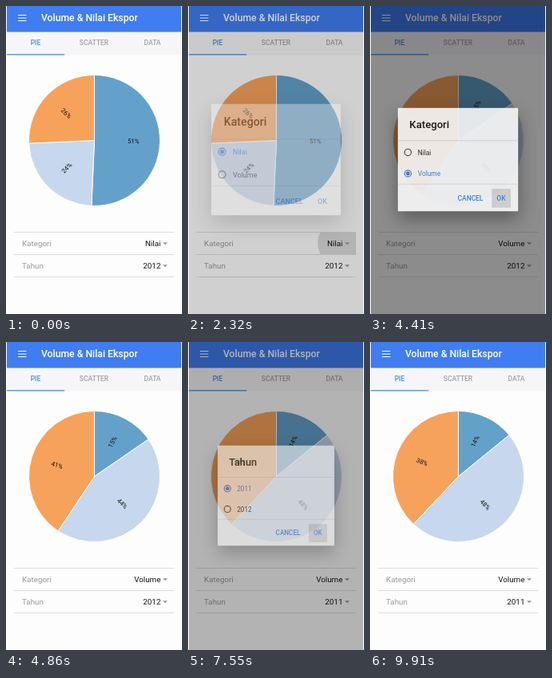
Recreate the animation shown at these times as an HTML page. Size 220x386 px, loop 9.96 s.

```html
<!DOCTYPE html>
<html lang="id">
<head>
<meta charset="utf-8">
<title>Volume &amp; Nilai Ekspor</title>
<style>
  html, body { margin: 0; width: 100%; height: 100%; overflow: hidden; background: #fdfdfd; }
  svg { display: block; width: 220px; height: 386px; font-family: Roboto, sans-serif; }
  .title { font-size: 12.2px; font-weight: 500; fill: #fff; }
  .tab { font-size: 8.5px; font-weight: 500; fill: #a3a3a6; text-anchor: middle; }
  .tab.on { fill: #4a8bd8; }
  .label { font-size: 9.8px; fill: #999; }
  .value { font-size: 9.8px; fill: #151515; text-anchor: end; }
  .slice { stroke: #fff; stroke-width: 1; }
  .pct { font-size: 7.9px; fill: #111; text-anchor: middle; }
  .ripple { fill: #555; }
  .card { fill: #fafafa; filter: drop-shadow(0 9.5px 12px rgba(0, 0, 0, .42)); }
  .head { font-size: 13.3px; font-weight: 500; fill: #111; }
  .opt { font-size: 8.5px; }
  .ring { fill: none; stroke-width: 1.2; }
  .dot { fill: #3b76d6; }
  .btn { font-size: 8.5px; font-weight: 500; fill: #3b7de0; }
  .rule { stroke: #dedede; stroke-width: 1; }
</style>
</head>
<body>
<svg viewBox="0 0 220 386">
  <defs>
    <clipPath id="row0"><rect x="10" y="283" width="200" height="28.5"/></clipPath>
    <clipPath id="row1"><rect x="10" y="311.5" width="200" height="28"/></clipPath>
    <clipPath id="opt0"><rect x="34" y="169" width="152" height="28"/></clipPath>
    <clipPath id="opt1"><rect x="34" y="197" width="152" height="26.5"/></clipPath>
  </defs>
  <rect width="220" height="386" fill="#fdfdfd"/>

  <rect y="32" width="220" height="29.5" fill="#f6f6f8"/>
  <rect width="220" height="32.5" fill="#3f7df0"/>
  <path d="M15 11.5H25.5M15 15H25.5M15 18.5H25.5" stroke="#fff" stroke-width="1.2"/>
  <text class="title" x="44" y="19.2">Volume &amp; Nilai Ekspor</text>
  <text class="tab on" x="37" y="49.3">PIE</text>
  <text class="tab" x="110" y="49.3">SCATTER</text>
  <text class="tab" x="183" y="49.3">DATA</text>
  <rect y="60.2" width="73.3" height="1.3" fill="#4f93dc"/>

  <g id="pies"></g>

  <g clip-path="url(#row0)"><circle id="rip0" class="ripple" cx="195" cy="297"/></g>
  <g clip-path="url(#row1)"><circle id="rip1" class="ripple" cx="195" cy="325"/></g>
  <path class="rule" d="M10 283.5H210M10 311.5H210M10 339.5H210"/>
  <text class="label" x="20" y="301">Kategori</text>
  <text class="label" x="20" y="329">Tahun</text>
  <text class="value" id="kind" x="193.4" y="301"></text>
  <text class="value" id="year" x="193.4" y="329"></text>
  <path d="M196 296.3h6l-3 3zM196 324.3h6l-3 3z" fill="#999"/>

  <rect id="shade" width="220" height="386" fill="#000"/>
  <g id="dialogs"></g>
  <path d="M.5 0V386M219.5 0V386" stroke="#fdfdfd"/>
</svg>
<script>
const LOOP = 9960, FADE = 200;
const CX = 110.5, CY = 168.5, R = 82, LABEL_R = 48.8;
const BLUE = '#3b7de0', DARK = '#444';
const COLORS = ['#64a1ca', '#c7d7ed', '#f7a25b'];
const PIES = [[50.7, 23.6, 25.7], [15.4, 43.9, 40.7], [14.1, 47.9, 38]];

// Times in ms; tap is the touch on the row that opens the dialog.
const DIALOGS = [
  { title: 'Kategori', options: ['Nilai', 'Volume'], from: 0, to: 1, touch: [86, 211],
    tap: 2100, open: 2240, pick: 3400, ok: 4220, close: 4370 },
  { title: 'Tahun', options: ['2011', '2012'], from: 1, to: 0, touch: [63.7, 185],
    tap: 5310, open: 5450, pick: 6490, ok: 7310, close: 7463 }
];

const $ = id => document.getElementById(id);
const set = (el, attrs) => { for (const k in attrs) el.setAttribute(k, attrs[k]); };
const clamp = x => Math.min(1, Math.max(0, x));
const ease = (t, start, span) => { const p = clamp((t - start) / span); return p * p * (3 - 2 * p); };

function pieMarkup(parts) {
  const at = (deg, r) => {
    const a = deg * Math.PI / 180;
    return [CX + r * Math.sin(a), CY - r * Math.cos(a)];
  };
  let angle = 0, slices = '', labels = '';
  parts.forEach((part, i) => {
    const end = angle + part * 3.6, mid = (angle + end) / 2;
    const [x, y] = at(mid, LABEL_R), turn = mid < 180 ? mid - 90 : mid + 90;
    slices += `<path class="slice" fill="${COLORS[i]}" d="M${CX} ${CY}L${at(angle, R)}A${R} ${R} 0 ${part > 50 ? 1 : 0} 1 ${at(end, R)}Z"/>`;
    labels += `<text class="pct" y="2.6" transform="translate(${x} ${y}) rotate(${turn})">${Math.round(part)}%</text>`;
    angle = end;
  });
  return `<g>${slices}${labels}</g>`;
}

function dialogMarkup(d) {
  const option = (name, i) => {
    const y = 183.3 + i * 26.9;
    return `<circle class="ring" cx="46.7" cy="${y}" r="4.2"/><circle class="dot" cx="46.7" cy="${y}"/>
      <text class="opt" x="59.2" y="${y + 3.2}">${name}</text>`;
  };
  return `<g>
    <rect class="card" x="34" y="127" width="152" height="131" rx="1.2"/>
    <text class="head" x="48.7" y="153">${d.title}</text>
    <path class="rule" d="M34 168.5H186M34 223.5H186"/>
    <g clip-path="url(#opt${d.to})"><circle class="ripple pick" cx="${d.touch[0]}" cy="${d.touch[1]}"/></g>
    ${d.options.map(option).join('')}
    <rect class="press" x="152.7" y="229.5" width="24" height="24" rx="1" fill="#777"/>
    <text class="btn" x="109.6" y="244.5">CANCEL</text>
    <text class="btn" x="158.9" y="244.5">OK</text>
  </g>`;
}

$('pies').innerHTML = PIES.map(pieMarkup).join('');
$('dialogs').innerHTML = DIALOGS.map(dialogMarkup).join('');
const pies = [...$('pies').children];
DIALOGS.forEach((d, i) => {
  d.el = $('dialogs').children[i];
  d.rings = d.el.querySelectorAll('.ring');
  d.dots = d.el.querySelectorAll('.dot');
  d.names = d.el.querySelectorAll('.opt');
  d.ripple = d.el.querySelector('.pick');
  d.press = d.el.querySelector('.press');
});

function ripple(el, t, start, span, size, alpha) {
  const p = clamp((t - start) / span);
  set(el, { r: size * ease(t, start, span), opacity: alpha * (1 - p) });
}

function drawDialog(d, i, t) {
  const shown = ease(t, d.open, FADE), gone = ease(t, d.close, FADE);
  const scale = 1.1 - .1 * shown - .1 * gone;
  ripple($('rip' + i), t, d.tap, 760, 160, .3);
  set(d.el, {
    opacity: shown * (1 - gone),
    visibility: shown > 0 && gone < 1 ? 'visible' : 'hidden',
    transform: `translate(110 192.5) scale(${scale}) translate(-110 -192.5)`
  });
  const current = t < d.pick ? d.from : d.to, moved = ease(t, d.pick, 280);
  d.options.forEach((_, k) => {
    const on = k === current, fill = k === d.to ? moved : 1 - moved;
    set(d.rings[k], { stroke: on || fill > 0 ? BLUE : DARK });
    set(d.names[k], { fill: on ? BLUE : '#222' });
    set(d.dots[k], { r: 2.5 * fill });
  });
  ripple(d.ripple, t, d.pick - 90, 600, 135, .32);
  set(d.press, { opacity: .28 * ease(t, d.ok, 100) });
  return .5 * shown * (1 - gone);
}

function draw(t) {
  const [kind, year] = DIALOGS;
  const step = (t >= kind.close) + (t >= year.close);
  pies.forEach((p, i) => set(p, { visibility: i === step ? 'visible' : 'hidden' }));
  $('kind').textContent = kind.options[step > 0 ? kind.to : kind.from];
  $('year').textContent = year.options[step > 1 ? year.to : year.from];
  const shade = DIALOGS.map((d, i) => drawDialog(d, i, t));
  set($('shade'), { opacity: Math.max(...shade) });
}

const begin = performance.now();
function tick() {
  draw((performance.now() - begin) % LOOP);
  requestAnimationFrame(tick);
}
tick();
</script>
</body>
</html>
```
